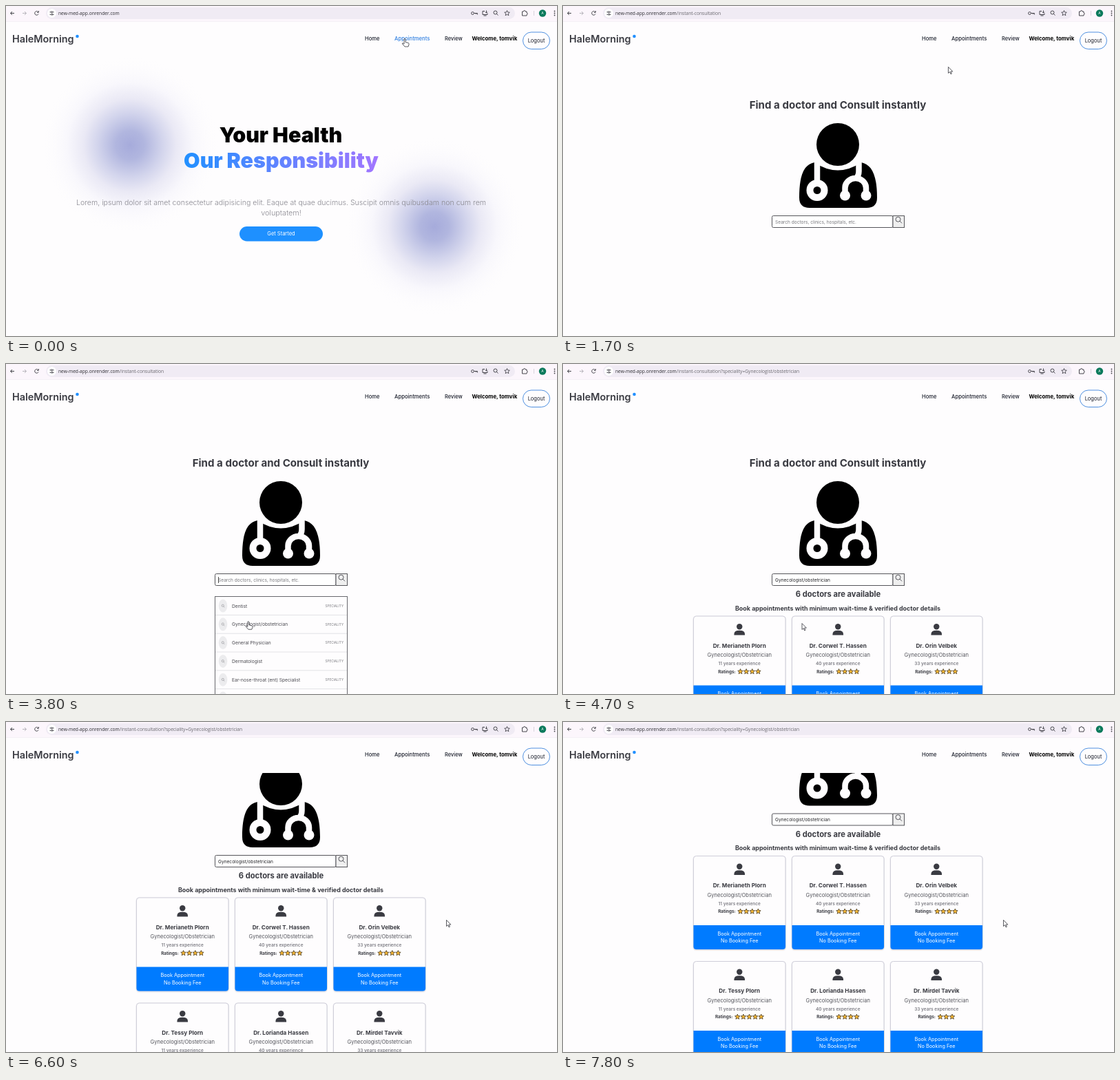
These frames come from a looping animation (800x479 px, 7900 ms). An HTML page:

```html
<!DOCTYPE html>
<html lang="en">
<head>
<meta charset="utf-8">
<title>Doctor booking walkthrough</title>
<style>
  html, body { margin: 0; width: 100%; height: 100%; overflow: hidden; background: #fefdfe; }
  svg { display: block; width: 800px; height: 479px; font-family: Inter, sans-serif; }
  .url { font: 6.65px "Open Sans", sans-serif; }
  .icons { fill: none; stroke: #47464d; stroke-width: 1; }
  .mid { text-anchor: middle; }
</style>
</head>
<body>
<svg id="stage" viewBox="0 0 800 479"></svg>
<script>
const LOOP = 7900, STEP = 100;
const INK = '#3a3b42', BLUE = '#007bff';

const text = (x, y, size, weight, fill, str, extra = '') =>
  `<text x="${x}" y="${y}" font-size="${size}" font-weight="${weight}" fill="${fill}" ${extra}>${str}</text>`;
const centered = (x, y, size, weight, fill, str) => text(x, y, size, weight, fill, str, 'class="mid"');
const lens = (x, y, r, color, width) =>
  `<path d="M${x + r * .7} ${y + r * .7}l${r * .9} ${r * .9}" stroke="${color}" stroke-width="${width}"/>
   <circle cx="${x}" cy="${y}" r="${r}" fill="none" stroke="${color}" stroke-width="${width}"/>`;

function starPath(cx, cy, r) {
  const points = Array.from({ length: 10 }, (_, i) => {
    const angle = i * Math.PI / 5 - Math.PI / 2, d = i % 2 ? r * .45 : r;
    return `${(cx + d * Math.cos(angle)).toFixed(2)} ${(cy + d * Math.sin(angle)).toFixed(2)}`;
  });
  return `M${points.join('L')}Z`;
}

function browserBar() {
  return `<rect width="800" height="22" fill="#fcf6fc"/>
    <path d="M0 22.5H800" stroke="#f4f0f6"/>
    <rect x="58" y="2" width="681" height="17" rx="8.5" fill="#f0ebf4"/>
    <circle cx="66.5" cy="10.5" r="6.5" fill="#fff"/>
    <g class="icons">
      <path d="M12 10.5H6.5M9 8l-2.5 2.5L9 13"/>
      <path d="M24 10.5h5.5M27 8l2.5 2.5L27 13" stroke="#b8b5bc"/>
      <path d="M46.6 8.5a2.8 2.8 0 1 0 .5 3M47.3 7v2.3H45"/>
      <path d="M63.5 8.8h2M67.5 8.8h2M63.5 12.3h2.2M68 12.3h1.5"/>
      <circle cx="66.5" cy="8.8" r="1"/><circle cx="66.8" cy="12.3" r="1"/>
      <circle cx="677.5" cy="10.5" r="1.9"/><path d="M679.5 10.5h5v2M682.5 10.5v1.5"/>
      <path d="M695 7.5h-3v5h7v-2M693.5 14h4M697.5 6.5v3.5M696 8.7l1.5 1.5 1.5-1.5"/>
      ${lens(710.5, 9.5, 2.5, '#47464d', 1)}
      <path d="${starPath(727.5, 10.5, 4)}" stroke-width=".9"/>
      <path d="M749.5 8h2q0-1.5 1.2-1.5T754 8h2v2q1.2 0 1.2 1.2T756 12.5v1.5h-6.5z"/>
      <path d="M766.5 7v7" stroke="#d8d3dc"/>
    </g>
    <circle cx="779" cy="10.5" r="5.2" fill="#0b7a5c"/>
    ${centered(779, 12.2, 4.8, 400, '#fff', 'A')}
    <g fill="#47464d"><circle cx="796.5" cy="7.5" r=".9"/><circle cx="796.5" cy="10.5" r=".9"/><circle cx="796.5" cy="13.5" r=".9"/></g>
    <text class="url" x="76" y="13" fill="#2b2a30">new-med-app.onrender.com<tspan id="path" fill="#69676e"></tspan></text>`;
}

function siteHeader() {
  return `<rect y="23" width="800" height="51" fill="#fefdfe"/>
    ${text(9, 53, 14.4, 600, INK, 'HaleMorning')}
    <circle cx="103.5" cy="44" r="2.3" fill="#2190ff"/>
    ${text(521, 50.3, 7.6, 500, '#1b1f2c', 'Home')}
    ${text(564, 50.3, 7.7, 500, '#1b1f2c', 'Appointments', 'id="appointments"')}
    ${text(637, 50.3, 7.5, 500, '#1b1f2c', 'Review')}
    ${text(676.5, 50.3, 7.8, 700, '#000', 'Welcome, tomvik')}
    <rect x="750.5" y="38" width="39" height="24.5" rx="12.25" fill="#fefdfe" stroke="#3a83dc" stroke-width=".9"/>
    ${centered(770, 53, 7.5, 400, '#1b1f2c', 'Logout')}`;
}

function landing() {
  const blob = (x, y) => `<circle cx="${x}" cy="${y}" r="130" fill="url(#blob)"/>`;
  return `${blob(180, 202)}${blob(622, 320)}
    ${centered(399, 197.5, 30.4, 900, '#000', 'Your Health')}
    ${centered(399.5, 235, 30.4, 900, 'url(#title)', 'Our Responsibility')}
    ${centered(399.5, 289, 10.6, 300, '#8a8991', 'Lorem, ipsum dolor sit amet consectetur adipisicing elit. Eaque at quae ducimus. Suscipit omnis quibusdam non cum rem')}
    ${centered(399.5, 303.5, 10.8, 300, '#8a8991', 'voluptatem!')}
    <rect x="339" y="320" width="121" height="21.5" rx="10.75" fill="#1e90ff"/>
    ${centered(399.5, 333.3, 7.5, 400, '#fff', 'Get Started')}`;
}

const doctorIcon = `<g id="doctor">
  <path d="M343 278C343 245 350 230 365 227Q399 250 433 227C448 230 456 245 456 278Q456 293 441 293H358Q343 293 343 278Z"/>
  <circle cx="399" cy="201" r="37" fill="#fefdfe"/><circle cx="399" cy="201" r="31"/>
  <g fill="none" stroke="#fefdfe" stroke-width="8.5">
    <path d="M369 225V256M429.5 225V240Q429.5 247 425 250M409.5 274V264a15.25 14 0 0 1 30.5 0V274"/>
  </g>
  <g fill="#fefdfe"><circle cx="369" cy="267.5" r="15.5"/><circle cx="409.5" cy="275" r="7.5"/><circle cx="440" cy="275" r="7.5"/></g>
  <circle cx="369" cy="267.5" r="5.5"/>
</g>`;

const searchBox = `<rect x="303.5" y="304.5" width="175.5" height="17" rx="2" fill="#fff" stroke="#55555a"/>
  <rect x="479" y="304.5" width="16.5" height="17" fill="#efefef" stroke="#55555a"/>
  ${lens(486.5, 309.7, 3.5, '#33333a', .8)}
  ${text(308, 315.5, 6.6, 400, '#77777c', '', 'id="query"')}
  <path id="caret" d="M308.5 309V318" stroke="#222" stroke-width=".8"/>`;

function specialityList() {
  const names = ['Dentist', 'Gynecologist/obstetrician', 'General Physician', 'Dermatologist', 'Ear-nose-throat (ent) Specialist', ''];
  const rows = names.map((name, i) => {
    const y = 351 + i * 26.8;
    return `<ellipse cx="315" cy="${y}" rx="6.3" ry="9.5" fill="#ececee"/>
      ${lens(314.8, y - .3, 1.6, '#8d8d93', .6)}
      ${text(328, y + 2.5, 6.7, 400, '#48484e', name)}
      ${text(490, y + 1.7, 4.6, 400, '#77777d', 'SPECIALITY', 'text-anchor="end"')}
      <path d="M304 ${y + 13.4}H495" stroke="#dcdce0" stroke-width=".8"/>`;
  });
  return `<rect x="303.5" y="337.5" width="192" height="200" fill="#fefdfe" stroke="#68686d"/>${rows.join('')}`;
}

function doctorCard({ name, years, stars }, i) {
  const x = 189.5 + i % 3 * 143, y = 366 + Math.floor(i / 3) * 153;
  const cx = x + 66.75, left = cx - 14 - stars * 4.25;
  const rating = Array.from({ length: stars }, (_, k) =>
    `<path d="${starPath(left + 32.3 + k * 8.6, y + 80.5, 4)}" fill="#f7b733" stroke="#4a3b22" stroke-width=".8"/>`);
  return `<rect x="${x}" y="${y + .6}" width="133.5" height="136" rx="4" fill="none" stroke="#e8e8ec" stroke-width="2"/>
    <rect x="${x}" y="${y}" width="133.5" height="135.5" rx="4" fill="#fefdfe" stroke="#cbcad6" stroke-width=".9"/>
    <g fill="${INK}"><circle cx="${cx}" cy="${y + 15.3}" r="4.2"/>
      <path d="M${cx - 7.8} ${y + 27.5}v-1.5q0-5.3 7.8-5.3t7.8 5.3v1.5z"/></g>
    ${centered(cx, y + 45.7, 8.2, 700, INK, 'Dr. ' + name)}
    ${centered(cx, y + 59.4, 7.6, 400, '#55565d', 'Gynecologist/Obstetrician')}
    ${centered(cx, y + 71, 6.5, 600, '#7d7d84', years + ' years experience')}
    ${text(left, y + 82.8, 6.3, 700, INK, 'Ratings:')}${rating.join('')}
    <path d="M${x} ${y + 100.5}h133.5v31q0 4-4 4h-125.5q-4 0-4-4z" fill="${BLUE}"/>
    ${centered(cx, y + 115, 7.3, 400, '#fff', 'Book Appointment')}
    ${centered(cx, y + 125.7, 7.3, 400, '#fff', 'No Booking Fee')}`;
}

const doctors = [
  { name: 'Merianeth Plorn', years: 11, stars: 4 },
  { name: 'Corwel T. Hassen', years: 40, stars: 4 },
  { name: 'Orin Velbek', years: 33, stars: 4 },
  { name: 'Tessy Plorn', years: 11, stars: 5 },
  { name: 'Lorianda Hassen', years: 40, stars: 4 },
  { name: 'Mirdel Tavvik', years: 33, stars: 3 },
];

document.getElementById('stage').innerHTML = `
  <defs>
    <radialGradient id="blob">
      <stop offset="0" stop-color="#a6abdb"/><stop offset=".16" stop-color="#b1b6df"/>
      <stop offset=".36" stop-color="#d2d4ec"/><stop offset=".52" stop-color="#eae9f5"/>
      <stop offset=".7" stop-color="#f8f7fc"/><stop offset="1" stop-color="#fefdfe" stop-opacity="0"/>
    </radialGradient>
    <linearGradient id="title"><stop stop-color="#2190ff"/><stop offset="1" stop-color="#a276ff"/></linearGradient>
  </defs>
  <rect width="800" height="479" fill="#fefdfe"/>
  <g id="landing">${landing()}</g>
  <g id="consult">
    ${centered(399, 148.7, 15.1, 700, INK, 'Find a doctor and Consult instantly')}
    <rect id="placeholder" x="364.5" y="191.5" width="69.5" height="87" fill="none" stroke="#000" stroke-width="2"/>
    ${doctorIcon}${searchBox}
    <g id="list">${specialityList()}</g>
    <g id="results">
      ${centered(399.5, 338, 11.2, 700, INK, '6 doctors are available')}
      ${centered(399, 357.8, 8.95, 700, INK, 'Book appointments with minimum wait-time &amp; verified doctor details')}
      ${doctors.map(doctorCard).join('')}
    </g>
  </g>
  ${siteHeader()}${browserBar()}
  <circle id="ring" fill="none" stroke="#cf8173" stroke-width="1.2"/>
  <g id="cursor" fill="#fff" stroke="#33333a" stroke-width=".8" stroke-linejoin="round">
    <path id="hand" d="M-1 .5q1-1.3 2 0V5l4 1q1.5.5 1 2.5l-1 3H0l-3.5-4q-.5-1.5.8-1L-1 7.7z"/>
    <path id="arrow" d="M0 0v9l2.1-1.9 1.5 3.3 1.3-.6-1.4-3.2h2.9z"/>
  </g>`;

const el = Object.fromEntries([...document.querySelectorAll('#stage [id]')].map(node => [node.id, node]));
const show = (node, visible) => node.setAttribute('visibility', visible ? 'inherit' : 'hidden');

// Each key is [time, ...values]; values ease between neighbouring keys.
function track(keys, t) {
  const next = keys.findIndex(key => key[0] > t);
  if (next < 0) return keys.at(-1).slice(1);
  if (next === 0) return keys[0].slice(1);
  const a = keys[next - 1], b = keys[next];
  const p = (t - a[0]) / (b[0] - a[0]), eased = p * p * (3 - 2 * p);
  return a.slice(1).map((v, i) => v + (b[i + 1] - v) * eased);
}

const pointerKeys = [[0, 579, 47.5], [200, 578, 47], [1500, 578, 47], [2300, 459, 312.5], [3100, 459, 312.5],
  [3900, 347, 376.5], [5200, 347, 376.5], [5900, 639.5, 287.5]];
const scrollKeys = [[5800, 0], [6000, 38], [6300, 92], [6500, 92], [6600, 111], [6800, 152], [6900, 152], [7100, 171.5]];
const clicks = [400, 2500, 4000];
const OPEN_PAGE = 500, IMAGE_READY = 1300, OPEN_LIST = 2500, PICK = 4200;

function draw(t) {
  const consult = t >= OPEN_PAGE, picked = t >= PICK, loaded = t >= IMAGE_READY;
  const [x, y] = track(pointerKeys, t), [scroll] = track(scrollKeys, t);
  const listOpen = t >= OPEN_LIST && !picked;
  const onLink = y < 56, onInput = y > 304 && !picked;

  show(el.landing, !consult);
  show(el.consult, consult);
  show(el.placeholder, consult && !loaded);
  show(el.doctor, loaded);
  show(el.list, listOpen);
  show(el.caret, listOpen);
  show(el.results, picked);
  el.consult.setAttribute('transform', `translate(0 ${-scroll})`);

  el.path.textContent = (consult ? '/instant-consultation' : '') + (picked ? '?speciality=Gynecologist/obstetrician' : '');
  el.query.textContent = picked ? 'Gynecologist/obstetrician' : 'Search doctors, clinics, hospitals, etc.';
  el.query.setAttribute('fill', picked ? '#222226' : '#77777c');
  el.appointments.setAttribute('fill', onLink ? '#2f7fe0' : '#1b1f2c');

  el.cursor.setAttribute('transform', `translate(${x} ${y})`);
  show(el.hand, onLink || onInput);
  show(el.arrow, !onLink && !onInput);

  const click = clicks.find(start => t > start && t < start + 600);
  show(el.ring, click !== undefined);
  if (click !== undefined) {
    const age = t - click;
    el.ring.setAttribute('cx', x);
    el.ring.setAttribute('cy', y);
    el.ring.setAttribute('r', age / 40);
    el.ring.setAttribute('opacity', Math.min(1, (600 - age) / 250));
  }
}

const begin = performance.now();
function tick() {
  const t = (performance.now() - begin) % LOOP;
  draw(Math.floor(t / STEP) * STEP);
  requestAnimationFrame(tick);
}
tick();
</script>
</body>
</html>
```
